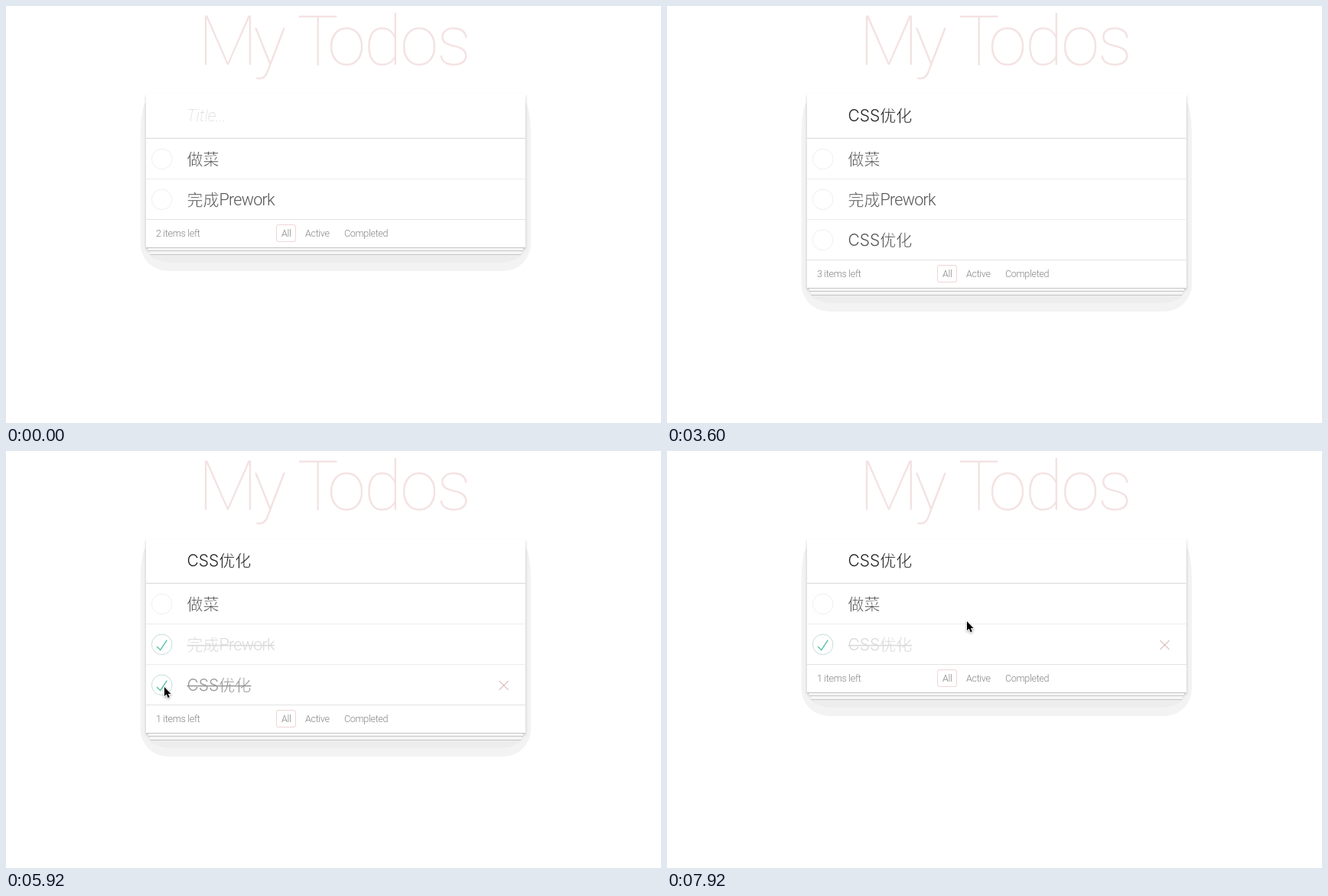
Animation of 856x546 px, one loop 8 s. Source, as an HTML page with a canvas:

```html
<!DOCTYPE html>
<html lang="zh">
<head>
<meta charset="utf-8">
<title>My Todos</title>
<style>
  html, body { margin: 0; width: 100%; height: 100%; overflow: hidden; background: #fff; }
  canvas { display: block; }
</style>
</head>
<body>
<canvas id="stage" width="856" height="546"></canvas>
<script>
const ctx = document.getElementById('stage').getContext('2d');
const LOOP = 8000, STEP = 80, BLINK = 480, FADE = 400;
const FOCUS = 2000, PASTED = 2880, ADDED = 3600, BLUR = 4880, DELETED = 7520;
const LEFT = 183, WIDTH = 495.5, TOP = 115, LIST_TOP = 174, ROW = 53;

const roboto = (size, weight = 300) => `${weight} ${size}px Roboto, "Liberation Sans", sans-serif`;
const INTER = '300 21px Inter, "Liberation Sans", sans-serif';
const HAN = '300 21px "Noto Sans CJK SC", "Noto Sans CJK JP", "Noto Sans CJK", sans-serif';
const run = (text, font, gap = 0) => ({ text, font, gap });

const todos = [
  { runs: [run('做菜', HAN)], from: 0, to: LOOP, done: LOOP },
  { runs: [run('完成', HAN), run('Prework', roboto(21.6), -0.8)], from: 0, to: DELETED, done: 4930 },
  { runs: [run('CSS', INTER), run('优化', HAN)], from: ADDED, to: LOOP, done: 5800 }
];

// Pointer moves: start, end, and where it comes to rest.
const moves = [
  [480, 640, 399, 344], [800, 1120, 306, 169], [1120, 1440, 281, 148], [1440, 1680, 291, 158],
  [1840, 2080, 266, 149], [4080, 4560, 202, 252], [5520, 5840, 206, 308], [6160, 6400, 667, 205],
  [6400, 7040, 653, 256], [7760, 7920, 391, 222]
];

const within = (t, a, b) => t >= a && t < b;
const mix = (a, b, k) => a + (b - a) * k;
const easeOut = k => 1 - (1 - k) ** 2;
const progress = (t, a, b) => easeOut(Math.min(1, Math.max(0, (t - a) / (b - a))));

function pointerAt(t) {
  if (t < 480 || within(t, PASTED, 4160)) return null;
  return moves.reduce(([px, py], [a, b, x, y]) => {
    const k = progress(t, a, b);
    return [mix(px, x, k), mix(py, y, k)];
  }, [529, 530]);
}

// The row highlight trails the pointer by one step.
function hoverAt(t) {
  const p = pointerAt(t - STEP);
  if (!p || p[1] < LIST_TOP || within(t, DELETED, DELETED + STEP)) return null;
  return { row: Math.floor((p[1] - LIST_TOP) / ROW), hot: p[0] > 633 };
}

// Blinking restarts whenever the text changes.
function caretVisible(t) {
  const since = t - (t < PASTED ? FOCUS : PASTED);
  return within(t, FOCUS, BLUR) && Math.floor(since / BLINK) % 2 === 0;
}

function label(text, x, y, font, color, gap = 0) {
  ctx.font = font;
  ctx.letterSpacing = gap + 'px';
  ctx.fillStyle = color;
  ctx.fillText(text, x, y);
  if (font === HAN) {
    // A white outline thins the strokes to a light weight.
    ctx.strokeStyle = '#fff';
    ctx.lineWidth = 0.55;
    ctx.strokeText(text, x, y);
  }
  return x + ctx.measureText(text).width;
}

const phrase = (runs, y, color) =>
  runs.reduce((x, r) => label(r.text, x, y, r.font, color, r.gap), 236.5);

function box(x, y, w, h, color) {
  ctx.fillStyle = color;
  ctx.fillRect(x, y, w, h);
}

function rounded(x, y, w, h, radii, color) {
  ctx.beginPath();
  ctx.roundRect(x, y, w, h, radii);
  ctx.fillStyle = color;
  ctx.fill();
}

function trace(points, x, y) {
  ctx.beginPath();
  for (const [dx, dy] of points) ctx.lineTo(x + dx, y + dy);
}

function stroke(color, width) {
  ctx.strokeStyle = color;
  ctx.lineWidth = width;
  ctx.stroke();
}

function shaded(dy, blur, alpha, draw) {
  ctx.save();
  ctx.shadowColor = `rgba(0,0,0,${alpha})`;
  ctx.shadowOffsetY = dy;
  ctx.shadowBlur = blur;
  draw();
  ctx.restore();
}

function drawCard(bottom) {
  const shoulder = { x: 8, y: 46 }, tuck = { x: 35, y: 19 };
  rounded(175.5, 126, 510.5, bottom - 96, [shoulder, shoulder, 36, 36], '#f3f3f3');
  rounded(LEFT, TOP + 40, WIDTH, bottom - TOP - 21, [0, 0, tuck, tuck], '#ededed');
  shaded(1.8, 3.6, 0.2, () => box(LEFT, TOP, WIDTH, bottom - TOP, '#fff'));
  for (let i = 2; i >= 0; i--) {
    const x = LEFT + 2.7 * i, w = WIDTH - 5.4 * i, y = bottom + Math.round(4.4 * i);
    box(x, y - 45, w, 45, '#f6f6f6');
    box(x, y - 1, w, 1, '#c6c6c6');
  }
  box(LEFT, TOP, WIDTH, bottom - 1 - TOP, '#fff');
  box(LEFT, 172, WIDTH, 1, '#f3f3f3');
  box(LEFT, 173, WIDTH, 1, '#e0e0e0');
}

function drawTodo(todo, i, t, hover) {
  const y = LIST_TOP + i * ROW, mid = y + 26.3, done = t >= todo.done;
  const shade = Math.round(mix(84, 217, progress(t, todo.done, todo.done + FADE)));
  const color = `rgb(${shade},${shade},${shade})`;

  ctx.beginPath();
  ctx.arc(203.7, mid, 13.3, 0, 7);
  stroke(done ? '#bddad5' : '#ededed', 0.9);
  if (done) {
    trace([[-6.6, 2.4], [-2, 7], [6.6, -6]], 203.7, mid + 0.3);
    stroke('#5dc2af', 1.5);
  }

  const end = phrase(todo.runs, y + 34, color);
  if (done) box(236.5, mid + 0.5, end - 236.5, 1.6, color);
  if (hover && hover.row === i) {
    for (const side of [-6, 6]) {
      trace([[-6, -side], [6, side]], 650.5, mid + 0.7);
      stroke(hover.hot ? '#af5b5e' : '#cc9a9a', 1);
    }
  }
  box(LEFT, y + 52, WIDTH, 1, '#ededed');
}

function drawFooter(top, left) {
  const small = roboto(12.6);
  const item = (text, x) => label(text, x, top + 23, small, '#858585', -0.35);
  box(LEFT, top, WIDTH, 1, '#e2e2e2');
  item(`${left} items left`, 196);
  item('All', 360);
  item('Active', 391);
  item('Completed', 442);
  ctx.beginPath();
  ctx.roundRect(353.5, top + 7.5, 25, 22, 2.5);
  stroke('rgba(175,47,47,.2)', 1);
}

function drawBeam(x, y) {
  for (const [color, width] of [['#fff', 3], ['#222', 1.3]]) {
    for (const end of [-7, 7]) {
      trace([[-4, end], [0, end * 0.8], [4, end]], x, y);
      stroke(color, width);
    }
    trace([[0, -6], [0, 6]], x, y);
    stroke(color, width);
  }
}

function drawArrow(x, y) {
  trace([[0, 0], [0, 12], [2.7, 9.6], [4.7, 14.2], [6.8, 13.3], [4.9, 8.9], [8.5, 8.9]], x + 1, y + 1);
  ctx.closePath();
  shaded(1, 3, 0.4, () => stroke('#fff', 1.5));
  ctx.fillStyle = '#000';
  ctx.fill();
}

function draw(t) {
  const visible = todos.filter(d => within(t, d.from, d.to));
  const listEnd = LIST_TOP + visible.length * ROW - 1;
  const hover = hoverAt(t), pointer = pointerAt(t);

  ctx.clearRect(0, 0, 856, 546);
  const pink = 'rgba(175,47,47,.14)', big = roboto(91, 100);
  label('My', 251, 77, big, pink, -6);
  label('T', 380.5, 77, big, pink);
  label('odos', 420, 77, big, pink, -2.4);

  drawCard(listEnd + 38);
  if (t < PASTED) label('Title...', 236, 151, 'italic ' + roboto(21.6, 100), '#d2d2d2');
  else phrase(todos[2].runs, 151, '#222');
  if (caretVisible(t)) box(t < PASTED ? 237 : 323, 130, 1, 26, '#000');

  visible.forEach((todo, i) => drawTodo(todo, i, t, hover));
  drawFooter(listEnd, visible.filter(d => t < d.done).length);
  if (pointer) (within(pointer[1], 116, 166) ? drawBeam : drawArrow)(...pointer);
}

const start = performance.now();
function tick() {
  const t = (performance.now() - start) % LOOP;
  draw(Math.floor(t / STEP) * STEP);
  requestAnimationFrame(tick);
}
tick();
</script>
</body>
</html>
```
